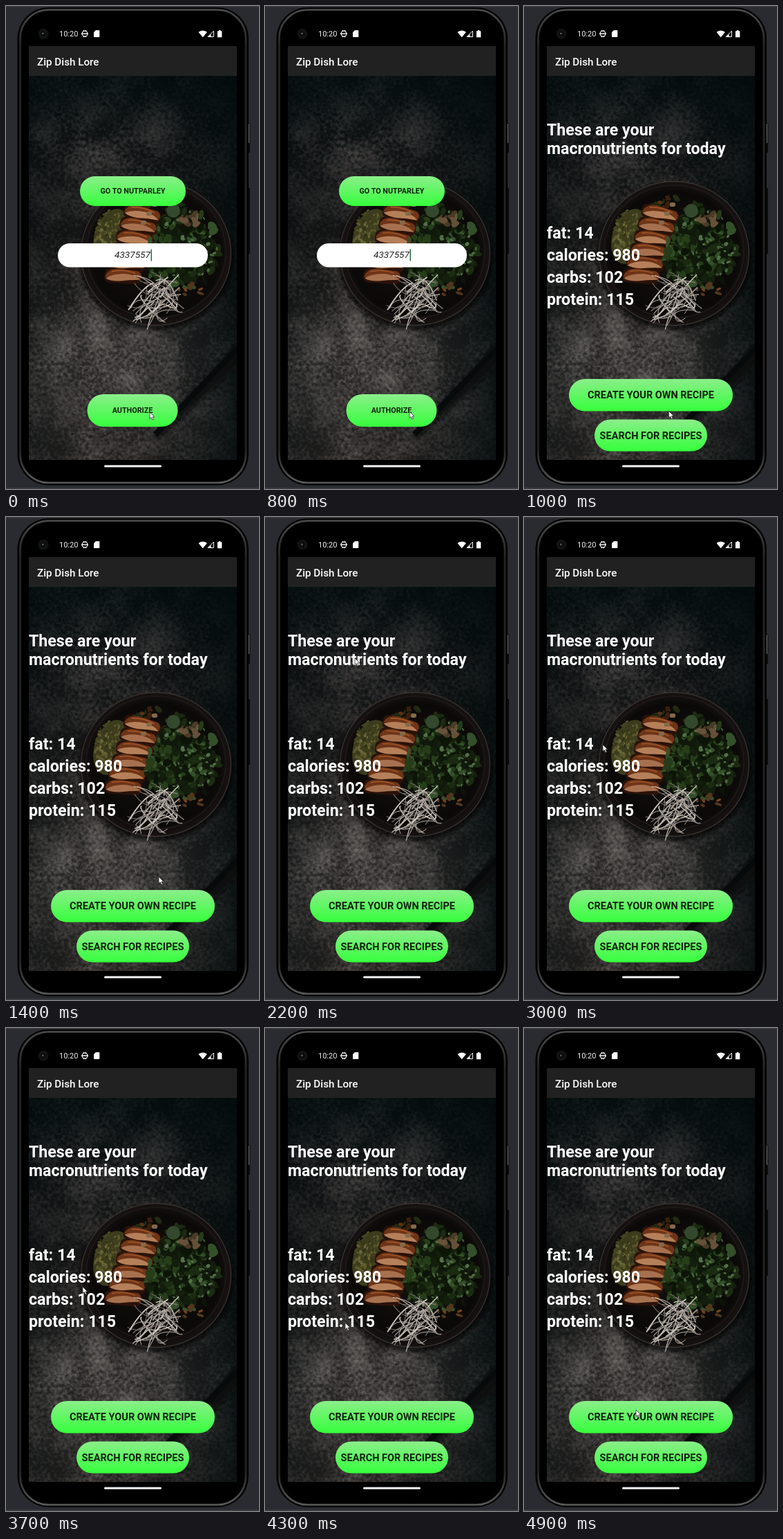
An HTML page that plays this animation: 366 by 698 pixels, repeating every 5 s.

```html
<!DOCTYPE html>
<html lang="en">
<head>
<meta charset="utf-8">
<title>Recipe app</title>
<style>
  html, body { margin: 0; width: 100%; height: 100%; overflow: hidden; background: #2a2b30; }
  svg { display: block; width: 366px; height: 698px; font-family: Roboto, sans-serif; }
  .label { font-weight: 700; fill: #10200d; text-anchor: middle; }
  .big { font-weight: 700; font-size: 23.2px; fill: #fff; }
</style>
</head>
<body>
<svg viewBox="0 0 366 698">
  <defs>
    <linearGradient id="green" x1="0" y1="0" x2="0" y2="1">
      <stop offset="0" stop-color="#8bee8a"/><stop offset="1" stop-color="#35ff3c"/>
    </linearGradient>
    <linearGradient id="stone" x1="0" y1="0" x2="0" y2="1">
      <stop offset="0" stop-color="#050d0e"/><stop offset=".2" stop-color="#101314"/>
      <stop offset=".5" stop-color="#171616"/><stop offset=".72" stop-color="#2b2928"/>
      <stop offset="1" stop-color="#211f1e"/>
    </linearGradient>
    <linearGradient id="grain" x1="0" y1="0" x2="0" y2="1">
      <stop offset="0" stop-color="#353b3b" stop-opacity=".35"/>
      <stop offset=".18" stop-color="#5a5553" stop-opacity=".7"/>
      <stop offset=".45" stop-color="#55504d" stop-opacity=".6"/>
      <stop offset=".72" stop-color="#75706c"/>
      <stop offset="1" stop-color="#605b57" stop-opacity=".8"/>
    </linearGradient>
    <linearGradient id="shade">
      <stop offset="0" stop-color="#020a0b" stop-opacity=".4"/>
      <stop offset=".3" stop-color="#020a0b" stop-opacity="0"/>
      <stop offset=".6" stop-color="#020a0b" stop-opacity=".1"/>
      <stop offset="1" stop-color="#020a0b" stop-opacity=".8"/>
    </linearGradient>
    <linearGradient id="rim" x1="0" y1="0" x2="0" y2="1">
      <stop offset="0" stop-color="#4c4c4c"/><stop offset=".08" stop-color="#242424"/>
      <stop offset=".93" stop-color="#242424"/><stop offset="1" stop-color="#5a5a5a"/>
    </linearGradient>
    <radialGradient id="bowl">
      <stop offset="0" stop-color="#14110f"/><stop offset=".85" stop-color="#0b0908"/>
      <stop offset="1" stop-color="#171312"/>
    </radialGradient>
    <filter id="rough" x="0" y="0" width="1" height="1" color-interpolation-filters="sRGB">
      <feTurbulence type="fractalNoise" baseFrequency=".02" numOctaves="2" seed="4" result="patches"/>
      <feTurbulence type="fractalNoise" baseFrequency=".2" numOctaves="4" seed="7"/>
      <feComposite in2="patches" operator="arithmetic" k2=".55" k3=".45"/>
      <feColorMatrix values="0 0 0 0 0  0 0 0 0 0  0 0 0 0 0  2.6 0 0 0 -.95"/>
      <feComposite in="SourceGraphic" operator="in"/>
    </filter>
    <filter id="soft"><feGaussianBlur stdDeviation="2.5"/></filter>
    <filter id="glow"><feGaussianBlur stdDeviation=".7"/></filter>
    <clipPath id="photoClip"><rect x="33" y="101" width="301" height="555"/></clipPath>
  </defs>

  <rect width="366" height="698" fill="#2a2b30"/>
  <path d="M0 .5h366M0 697h366" stroke="#3a3b3f" stroke-width="2"/>
  <path d="M351.500 169v43M351.500 263v95" stroke="#0c0c0d" stroke-width="3"/>
  <path d="M351.500 170v28" stroke="#77787a"/>
  <rect x="16.500" y="2" width="334.500" height="690.500" rx="45" fill="#040404"/>
  <rect x="20.500" y="5.500" width="326.500" height="683.500" rx="41" fill="none" stroke="url(#rim)" stroke-width="2.600" filter="url(#glow)"/>
  <rect x="23.500" y="8.500" width="320.500" height="677.500" rx="38" fill="#000"/>

  <circle cx="54" cy="40" r="7.500" fill="#111213"/>
  <circle cx="54" cy="40" r="3.600" fill="#0b0c0d"/>
  <circle cx="53.400" cy="39.700" r="1.200" fill="#606468"/>
  <text x="77" y="44" font-size="11" fill="#f2f2f2">10:20</text>
  <g fill="none" stroke="#f2f2f2" stroke-width="1.300">
    <circle cx="114" cy="40" r="3.900"/>
    <path d="M109 40h10M112 34.800l1 1.400M116 34.800l-1 1.400M112 45.200l1-1.400M116 45.200l-1-1.400"/>
  </g>
  <g fill="#fff">
    <path d="M130 35h4.500q.8 0 .8.800v8.400q0 .8-.8.800h-6.700q-.8 0-.8-.8v-6.200z"/>
    <path d="M278.500 37.800q6.200-4.600 12.400 0l-6.200 7.400z"/>
    <path d="M296.500 40.500v4.500h-4.500z"/>
    <path d="M292 44.500l8.400-8.400v8.400z" fill="none" stroke="#fff"/>
    <path d="M307.800 35h2.600v1.200h1.900v9h-6.400v-9h1.900z"/>
  </g>

  <rect x="33" y="58" width="301" height="43" fill="#212121"/>
  <text x="45" y="86" font-size="15.200" font-weight="500" fill="#fff">Zip Dish Lore</text>

  <g clip-path="url(#photoClip)">
    <rect x="33" y="101" width="301" height="555" fill="url(#stone)"/>
    <rect x="33" y="101" width="301" height="555" fill="url(#grain)" filter="url(#rough)"/>
    <rect x="33" y="101" width="301" height="555" fill="url(#shade)"/>
    <path d="M340 482L222 610q-12 14-2 16L340 516z" fill="#070d0e" opacity=".85" filter="url(#soft)"/>
    <path d="M336 494L216 619" stroke="#060a0b" stroke-width="8"/>
    <ellipse cx="217" cy="364" rx="112" ry="105" fill="#000" opacity=".6" filter="url(#soft)"/>
    <ellipse cx="217" cy="357.500" rx="108.500" ry="104" fill="url(#bowl)" stroke="#3a322f" stroke-width="1.300"/>
    <ellipse cx="217" cy="355" rx="101" ry="96" fill="none" stroke="#1d1817" stroke-width="2"/>
    <g id="food"></g>
  </g>

  <g id="login">
    <rect x="75" y="343" width="217" height="34.500" rx="17.200" fill="#fff"/>
    <text x="157" y="364" font-size="13.600" font-style="italic" fill="#222">4337557</text>
    <path id="caret" d="M210.300 351.500v17" stroke="#276b3c" stroke-width="1.500"/>
  </g>
  <g id="summary">
    <text class="big" x="33" y="187">These are your</text>
    <text class="big" x="33" y="214">macronutrients for today</text>
  </g>

  <rect x="142" y="663.500" width="83" height="3" rx="1.500" fill="#f4f4f4"/>
  <path id="cursor" d="M0 0v9.500l2.200-2 1.700 3.700 1.700-.8-1.700-3.500h3z" fill="#fff" stroke="#333" stroke-width=".8"/>
</svg>
<script>
const $ = id => document.getElementById(id);

function add(parent, tag, attrs, text) {
  const el = document.createElementNS("http://www.w3.org/2000/svg", tag);
  for (const key in attrs) el.setAttribute(key, attrs[key]);
  if (text) el.textContent = text;
  parent.appendChild(el);
  return el;
}

let seed = 11;
function rand(lo = 0, hi = 1) {
  seed = (seed * 16807) % 2147483647;
  return lo + (hi - lo) * seed / 2147483647;
}
const pick = list => list[Math.floor(rand(0, list.length))];

// Random point inside an ellipse
function spot(cx, cy, rx, ry) {
  const a = rand(0, Math.PI * 2), r = Math.sqrt(rand());
  return [cx + rx * r * Math.cos(a), cy + ry * r * Math.sin(a)];
}

function scatter(count, area, size, colors) {
  for (let i = 0; i < count; i++) {
    const [x, y] = spot(...area);
    const rx = rand(size * 0.5, size);
    add($("food"), "ellipse", {
      rx, ry: rx * rand(0.35, 0.8), fill: pick(colors),
      transform: `translate(${x} ${y}) rotate(${rand(0, 180)})`
    });
  }
}

function drawSalmon() {
  for (let i = 0; i < 6; i++) {
    const x = 198 - i * 5.5, y = 300 + i * 18;
    const slice = add($("food"), "g", { transform: `translate(${x} ${y}) rotate(${14 - i * 2})` });
    add(slice, "rect", { x: -28, y: -9, width: 54, height: 20, rx: 7, fill: "#2a120a" });
    add(slice, "path", { d: "M-27 4Q-25-9-8-10L20-8Q28-4 24 4Q8-3-10 1Q-22 3-27 4z", fill: "#6e3417" });
    add(slice, "path", { d: "M-26 5Q-14-3 4-3Q18-2 24 4Q8 5-6 8Q-20 9-26 5z", fill: i % 2 ? "#a77150" : "#b58059" });
    add(slice, "path", { d: "M-18-5Q0-10 16-5", fill: "none", stroke: "#a65a2a", "stroke-width": 1.4 });
  }
}

function drawNoodles() {
  for (let i = 0; i < 60; i++) {
    const [x, y] = spot(220, 424, 28, 28);
    const w = rand(4, 20), h = rand(-20, 16);
    add($("food"), "path", {
      d: `M${x - w} ${y - h}Q${x + rand(-14, 14)} ${y + rand(-16, 16)} ${x + w} ${y + h}`,
      fill: "none", stroke: pick(["#bdb6ad", "#968e87", "#d2cbc2", "#79716c"]),
      "stroke-width": rand(0.8, 1.8)
    });
  }
}

function drawFood() {
  const leaves = ["#131e0d", "#1b2b11", "#263d19", "#0c1408", "#34502a"];
  add($("food"), "ellipse", { cx: 153, cy: 333, rx: 25, ry: 41, fill: "#3c3c1d", transform: "rotate(18 153 333)" });
  scatter(120, [151, 333, 22, 38], 3.5, ["#5c5a2c", "#2d3015", "#6a6838", "#45441f"]);
  scatter(22, [213, 291, 36, 17], 6, ["#222b12", "#38200d", "#5d3012", "#1d2913"]);
  add($("food"), "ellipse", { cx: 250, cy: 350, rx: 48, ry: 52, fill: "#10180b" });
  scatter(180, [255, 348, 55, 61], 8, leaves);
  scatter(36, [262, 345, 46, 50], 4, ["#44633a", "#547048"]);
  scatter(12, [270, 307, 18, 10], 7, ["#665039", "#4b3a26"]);
  scatter(7, [267, 411, 18, 10], 6, ["#70401d", "#51371d"]);
  add($("food"), "circle", { cx: 242, cy: 296, r: 10, fill: "#33482c" });
  drawSalmon();
  scatter(45, [219, 362, 20, 36], 7, leaves);
  for (let i = 0; i < 3; i++)
    add($("food"), "rect", { x: 195 + i * 8, y: 310 - i * 13, width: 8, height: 6, rx: 2, fill: "#84694a" });
  drawNoodles();
}

function button(parent, x, y, w, h, size, label) {
  add(parent, "rect", { x, y, width: w, height: h, rx: h / 2, fill: "url(#green)" });
  add(parent, "text", { class: "label", x: x + w / 2, y: y + h / 2 + size * 0.36, "font-size": size }, label);
}

drawFood();
button($("login"), 107, 246, 153, 43, 10.8, "GO TO NUTPARLEY");
button($("login"), 117.5, 561, 131, 47, 10.8, "AUTHORIZE");
["fat: 14", "calories: 980", "carbs: 102", "protein: 115"].forEach((line, i) =>
  add($("summary"), "text", { class: "big", x: 33, y: 336 + i * 32 }, line));
button($("summary"), 65, 539, 237, 46.5, 14.5, "CREATE YOUR OWN RECIPE");
button($("summary"), 102, 597.5, 163, 46, 14.5, "SEARCH FOR RECIPES");

// Pointer stops: time, x, y
const stops = [
  [0, 208, 587], [800, 209, 586], [1100, 210, 585], [1400, 221, 520], [1800, 112, 190],
  [2200, 130, 204], [2600, 116, 308], [3000, 114, 329], [3700, 111, 374],
  [4300, 116, 426], [4900, 162, 552]
];

const slope = (i, axis) =>
  (stops[i + 1][axis] - stops[i][axis]) / (stops[i + 1][0] - stops[i][0]);

// Speed at a stop: still where the direction turns, else a smooth pass
function speed(i, axis) {
  if (i === 0 || i === stops.length - 1) return 0;
  const a = slope(i - 1, axis), b = slope(i, axis);
  return a * b > 0 ? 2 * a * b / (a + b) : 0;
}

function pointer(t) {
  const i = Math.max(0, stops.findLastIndex(s => s[0] <= t));
  if (i === stops.length - 1) return stops[i].slice(1);
  const span = stops[i + 1][0] - stops[i][0], u = (t - stops[i][0]) / span, v = 1 - u;
  return [1, 2].map(axis =>
    v * v * ((1 + 2 * u) * stops[i][axis] + u * span * speed(i, axis)) +
    u * u * ((1 + 2 * v) * stops[i + 1][axis] - v * span * speed(i + 1, axis)));
}

function render(ms) {
  const t = Math.floor((ms % 5000) / 100) * 100;
  const loggedIn = t >= 1000;
  $("login").setAttribute("display", loggedIn ? "none" : "inline");
  $("summary").setAttribute("display", loggedIn ? "inline" : "none");
  $("caret").setAttribute("opacity", t >= 200 && t < 700 ? 0 : 1);
  $("cursor").setAttribute("transform", `translate(${pointer(t)})`);
}

function tick() {
  render(performance.now());
  requestAnimationFrame(tick);
}
tick();
</script>
</body>
</html>
```
